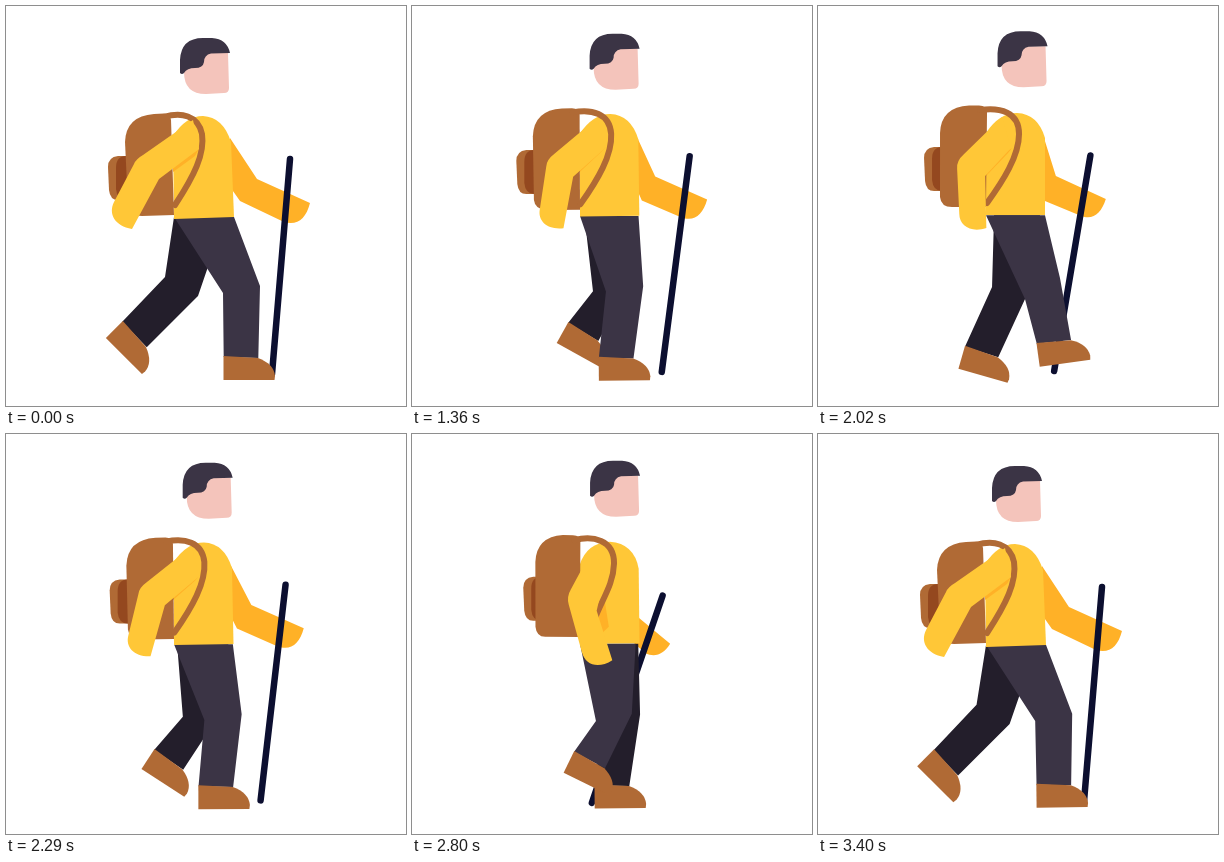
Animation of 400 by 400 pixels, one loop 3430 ms. Source, as an HTML page:

```html
<!DOCTYPE html>
<html lang="en">
<head>
<meta charset="utf-8">
<title>Hiker</title>
<style>
  html, body { margin: 0; width: 100%; height: 100%; overflow: hidden; background: #fff; }
  svg { display: block; width: 100%; height: 100%; }
</style>
</head>
<body>
<svg id="stage" viewBox="0 0 400 400"></svg>
<script>
const LOOP = 3430, REST = 1030;
const PACK = '#b06a35', PACK_DARK = '#94481f', SWEATER = '#ffc737', SWEATER_DARK = '#ffb127';
const PANTS = '#3b3445', PANTS_DARK = '#231e2b', SKIN = '#f4c4bb', POLE = '#0c0f30';
const stage = document.getElementById('stage');

function add(tag, attrs, parent = stage) {
  const el = document.createElementNS('http://www.w3.org/2000/svg', tag);
  for (const name in attrs) el.setAttribute(name, attrs[name]);
  return parent.appendChild(el);
}

// Upper body: each attribute is given for three swings and blended between them.
const SWINGS = [1, 0.43, -0.81];
const parts = [];

function part(el, attr, ...poses) {
  const numbers = poses.map(p => p.match(/-?[\d.]+/g).map(Number));
  parts.push({ el, attr, numbers, text: poses[0].split(/-?[\d.]+/) });
}

function shape(fill, ...poses) {
  part(add('path', { fill }), 'd', ...poses);
}

function line(stroke, width, ...poses) {
  part(add('path', { fill: 'none', stroke, 'stroke-width': width, 'stroke-linecap': 'round' }), 'd', ...poses);
}

function poseUpperBody(swing) {
  const weights = SWINGS.map(a => SWINGS.reduce((w, b) => a === b ? w : w * (swing - b) / (a - b), 1));
  for (const { el, attr, numbers, text } of parts) {
    const value = i => weights.reduce((sum, w, k) => sum + w * numbers[k][i], 0).toFixed(2);
    el.setAttribute(attr, text.map((t, i) => i < numbers[0].length ? t + value(i) : t).join(''));
  }
}

// Leg cycle: phase, ankle x y, foot angle, back of knee x y, front of knee x y, waist front x
const STRIDE = [
  [0,    235,   351,   0,   217, 287, 254, 280, 228],
  [0.16, 197,   351,   0,   189, 285, 226, 281, 226],
  [0.32, 163.5, 345.5, 16,  174, 281, 207, 293, 222],
  [0.4,  143.5, 340.5, 26,  163, 278, 201, 285, 219],
  [0.5,  128.5, 328,   45,  159, 271, 192, 290, 219],
  [0.66, 182,   326,   24,  186, 288, 222, 279, 224],
  [0.82, 236,   335.5, -8,  207, 293, 242, 272, 227],
  [0.9,  237,   334,   -23, 204, 284, 241, 272, 228]
];

function strideKey(i) {
  const n = STRIDE.length, turn = Math.floor(i / n);
  const [phase, ...values] = STRIDE[i - turn * n];
  return [phase + turn, ...values];
}

function strideAt(phase) {
  const p = phase % 1;
  const i = STRIDE.filter(k => k[0] <= p).length - 1;
  const [a, b, c, d] = [i - 1, i, i + 1, i + 2].map(strideKey);
  const span = c[0] - b[0], u = (p - b[0]) / span;
  return b.slice(1).map((from, j) => {
    const k = j + 1, to = c[k];
    const m0 = (to - a[k]) / (c[0] - a[0]) * span;
    const m1 = (d[k] - from) / (d[0] - b[0]) * span;
    const e = u * u * (3 - 2 * u);
    return from + (to - from) * e + u * (1 - u) * ((1 - u) * m0 - u * m1);
  });
}

function makeLeg(fill) {
  const limb = add('path', { fill });
  const boot = add('path', { fill: PACK, d: 'M-17.5-1L17 1Q33 7 34 19L33.5 23H-17.5Z' });
  return (phase, waistBack, waistY) => {
    const [x, y, angle, backX, backY, frontX, frontY, waistFront] = strideAt(phase);
    const r = angle * Math.PI / 180, dx = 17.3 * Math.cos(r), dy = 17.3 * Math.sin(r);
    limb.setAttribute('d', `M${waistBack} ${waistY}L${waistFront} ${waistY}L${frontX} ${frontY}` +
      `L${x + dx} ${y + dy + 1}L${x - dx} ${y - dy}L${backX} ${backY}Z`);
    boot.setAttribute('transform', `translate(${x} ${y}) rotate(${angle})`);
  };
}

// Far arm and pole
shape(SWEATER_DARK,
  'M224 132L251 173L304 197C300 213 291 220 278 216L234 195L222 178Z',
  'M226 132L238 170L288 193C283 209 274 215 261 209L227 195L222 178Z',
  'M221 135L226 189L252 217C245 226 237 228 228 225L220 212L212 190Z');
line(POLE, 6.5, 'M284 153L266 368', 'M272.5 149.5L236.5 365', 'M246 167L168 371');

const farLeg = makeLeg(PANTS_DARK);
const nearLeg = makeLeg(PANTS);

// Backpack pocket
const pocket = add('g', {});
add('path', { fill: PACK, d: 'M125 150H112Q102 151 102 161L103 184Q104 194 112 194H125Z' }, pocket);
add('path', { fill: PACK_DARK, d: 'M125 150H120Q110 150 110 162V183Q111 194 120 194H125Z' }, pocket);
part(pocket, 'transform', 'translate(0 0)', 'translate(4 -9)', 'translate(10 -4)');

// Torso, arm shadow, backpack, strap, near arm
shape(SWEATER,
  'M168 213L167 130Q180 110 197 110Q217 111 225 136L228 211Z',
  'M168 209L168 127Q181 107 199 107Q220 108 227 132L227 209Z',
  'M168 211L167 134Q172 110 197 109Q222 111 226 137L228 210Z');
shape(SWEATER_DARK,
  'M193 143L167 160L167 166L189 150Z',
  'M194 142L168 158L168 170L190 147Z',
  'M191 170L187 180L195 211L199 210Z');
shape(PACK,
  'M136 210L168 209L165 114Q164 108 158 107.5L148 108Q120 110 119 136L122 200Q123 209 136 210',
  'M134 201L168 201L169 106Q169 100 161 99.5L151 99.5Q123 101 122 127L122 191Q123 201 134 201',
  'M134 206L168 206L167 111Q167 104 160 104L150 104Q124 106 123 131L124 196Q125 206 134 206');
line(PACK, 6,
  'M158 111C175 106 192 109 196 128C199 148 188 170 169 199',
  'M162 104C182 101 201 106 201 128C201 150 185 175 169 197',
  'M161 109C178 103 200 106 201 130C201 150 193 160 188 180');
shape(SWEATER,
  'M187 114L137 149Q130 153 128 158L108 196C102 208 109 220 126 223L153 173L193 143Z',
  'M184 111L146 148Q138 155 139 163L141 208C141 220 153 227 168 222L167 170L193 142Z',
  'M182 114L161 158Q158 165 160 172L171 219C174 232 186 236 200 228L187 180L192 145Z');

// Head
const head = add('g', {});
add('path', { fill: SKIN, d: 'M178 47H222L223 82Q223 87 218 87L200 88Q178 88 178 66Z' }, head);
add('path', {
  fill: PANTS,
  d: 'M174 67V54Q175 32 197 32H206Q221 33 224 47L205 47.5Q198 49 198 56Q197 62 189 62Q181 62 178 67Q176 69 174 67Z'
}, head);
part(head, 'transform', 'translate(0 0)', 'translate(5.5 -6.7)', 'translate(2 -3)');

// Two strides, gathering speed at the start and slowing towards the end.
function walkPhase(t) {
  if (t <= 0) return 0;
  const startLag = t < 450 ? t - t * t / 900 : 225;
  const endLag = 306 * (Math.max(0, t - 1662) / 738) ** 2;
  return Math.min(2, (t - startLag - endLag) * 0.00107);
}

function draw(now) {
  const phase = walkPhase(now % LOOP - REST);
  const swing = Math.cos(2 * Math.PI * phase);
  const waistY = 209 + 2 * swing * swing;
  poseUpperBody(swing);
  farLeg(phase + 0.5, 168 + 14 * (1 - swing), waistY);
  nearLeg(phase, 168, waistY);
}

const start = performance.now();
function tick() {
  draw(performance.now() - start);
  requestAnimationFrame(tick);
}
tick();
</script>
</body>
</html>
```
